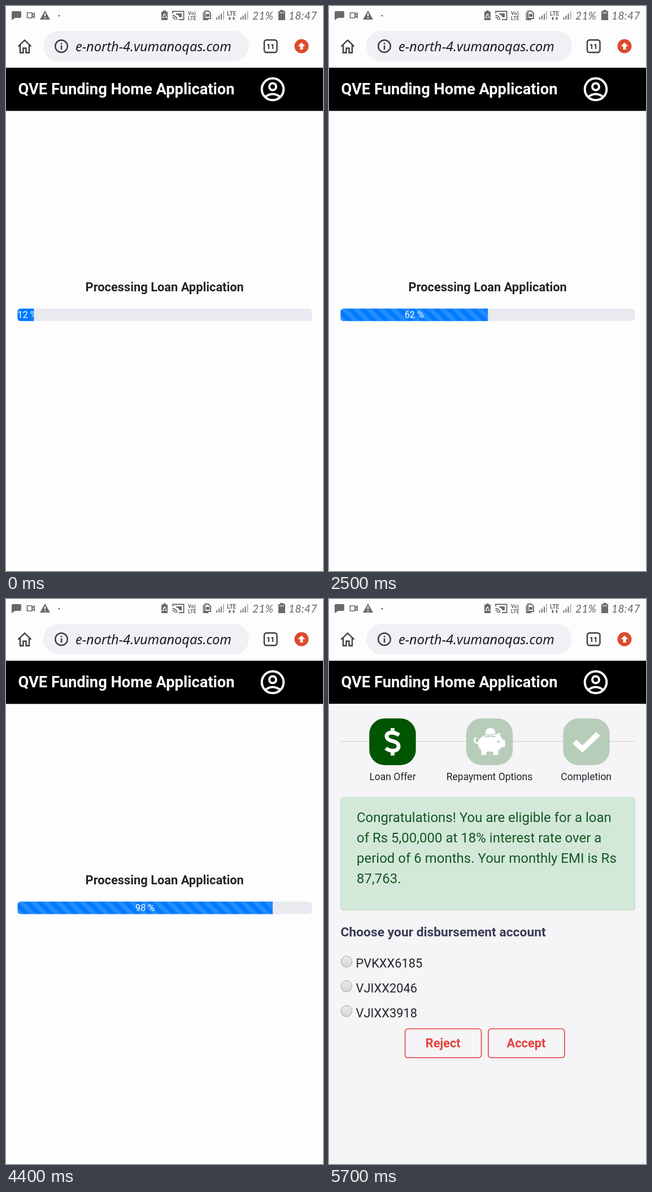
An HTML page that plays this animation: 561 by 998 pixels, repeating every 8 s.

```html
<!DOCTYPE html>
<html lang="en">
<head>
<meta charset="utf-8">
<title>Loan processing</title>
<style>
  html, body { margin: 0; width: 100%; height: 100%; overflow: hidden; background: #fefdfe; }
  svg { display: block; width: 100vw; height: 100vh; }
  text { font-family: Roboto, Arial, sans-serif; fill: #212529; }
  .bold { font-weight: 700; }
  .mid { text-anchor: middle; }
  .script { font-family: "Noto Sans", sans-serif; font-style: italic; fill: #1c1c1f; }
  .clock { font: italic 19px Lato, sans-serif; letter-spacing: .4px; fill: #666; }
  .tiny { font-weight: 700; fill: #6a6a6a; }
  .label { font-size: 17.5px; text-anchor: middle; }
  .alert text { font-size: 24px; fill: #155724; }
  .account { font-size: 21.84px; }
  .button rect { fill: none; stroke: #e2423e; stroke-width: 1.6; }
  .button text { font-size: 21.84px; font-weight: 700; text-anchor: middle; fill: #e2423e; }
  .line { fill: none; stroke: #3b3b40; stroke-width: 2.4; }
</style>
</head>
<body>
<svg viewBox="0 0 561 998" preserveAspectRatio="none">
  <defs>
    <pattern id="stripes" x="20.3" y="534.6" width="21.84" height="21.84" patternUnits="userSpaceOnUse">
      <path d="M0 21.84V10.92L10.92 21.84ZM0 0H10.92L21.84 10.92V21.84Z" fill="#fff" fill-opacity=".14"/>
    </pattern>
    <clipPath id="track"><rect x="20.3" y="534.6" width="521.2" height="22" rx="5.4"/></clipPath>
    <clipPath id="filled"><rect id="fillClip" x="20.3" y="534" height="23"/></clipPath>
    <clipPath id="face"><circle cx="472" cy="147" r="20"/></clipPath>
    <linearGradient id="knob" x2="0" y2="1">
      <stop stop-color="#ececec"/><stop offset="1" stop-color="#d4d4d4"/>
    </linearGradient>
    <g id="signal" fill="#747474">
      <path d="M0 20h2v4H0ZM4 17h2v7H4ZM8 13.500h2v10.500H8Z"/>
      <path d="M12 9h2v15h-2Z" fill="#b4b4b4"/>
    </g>
    <circle id="radio" cx="31" r="9.800" fill="url(#knob)" stroke="#a2a2a2"/>
  </defs>

  <rect width="561" height="998" fill="#fefdfe"/>

  <!-- status bar -->
  <g fill="#6a6a6a">
    <path d="M12 9H25Q27 9 27 11V19Q27 21 25 21H16L10 25V11Q10 9 12 9Z"/>
    <path d="M37.500 12h8.500v9h-8.500ZM46 16l4-3.500v8L46 17" fill="none" stroke="#6a6a6a" stroke-width="1.700"/>
    <path d="M69 8L78 24H60Z"/>
    <path d="M68 13h2v5h-2ZM68 20h2v2h-2Z" fill="#fff"/>
    <circle cx="94" cy="17" r="1.500"/>
    <path d="M278 8h5v2h3v15h-11V10h3Z"/>
    <path d="M280.500 13.500L284 20h-7Z" fill="none" stroke="#fff" stroke-width="1.500" stroke-dasharray="4 1.500"/>
    <path d="M295 13V9.500H314.500V24H306M294.500 16.500a8 8 0 0 1 8 8M294.500 20a4.500 4.500 0 0 1 4.500 4.500" fill="none" stroke="#6a6a6a" stroke-width="1.900"/>
    <path d="M301 13h10v7h-4q-2-5-6-5Z"/>
    <path d="M349.500 11V24H358M352 9h6l4 4v9h-10Z" fill="none" stroke="#6a6a6a" stroke-width="1.900"/>
    <path d="M354 14h6v5h-6Z"/>
    <use href="#signal" x="372"/>
    <use href="#signal" x="414.500"/>
    <path d="M396 19l2.500 3h-1.500v3h-2v-3h-1.500ZM403 25l-2.500-3h1.500v-3h2v3h1.500Z"/>
    <path d="M485 7h6v2h3v16h-12V9h3Z"/>
    <path d="M484 10.500h8v3h-8Z" fill="#aaa"/>
  </g>
  <text class="tiny" x="322" y="16" font-size="9">Vo)</text>
  <text class="tiny" x="322" y="25" font-size="9">LTE</text>
  <text class="tiny" x="391" y="16.500" font-size="10">LTE</text>
  <text class="clock" x="436" y="23.500">21%</text>
  <text class="clock" x="500" y="23.500">18:47</text>

  <!-- browser bar -->
  <path class="line" d="M21.500 71.500L33 60.500L44.500 71.500M25 69V82.500H30.500V74.500H35.500V82.500H41V69"/>
  <rect x="66" y="44" width="364" height="54" rx="27" fill="#f1f0f4"/>
  <circle class="line" cx="98" cy="71" r="10.800"/>
  <path d="M96.800 65h2.500v2.600h-2.500ZM96.800 69.500h2.500v7.500h-2.500Z" fill="#3b3b40"/>
  <text class="script" x="123" y="80" font-size="23.500">e-north-4.vumanoqas.com</text>
  <rect class="line" x="457" y="60" width="22.500" height="22" rx="4"/>
  <text class="bold mid" x="468.200" y="75.500" font-size="12.500">11</text>
  <circle cx="523" cy="71" r="12.500" fill="#dd4a2c"/>
  <path d="M523 64.500L529.500 71H525.500V77H520.500V71H516.500Z" fill="#fff"/>

  <!-- app header -->
  <rect y="109" width="561" height="76.300"/>
  <text class="bold" x="21.500" y="156" font-size="27.300" style="fill:#fff">QVE Funding Home Application</text>
  <g fill="none" stroke="#fff" stroke-width="4">
    <circle cx="472" cy="147" r="19.300"/>
    <circle cx="472" cy="142.500" r="6"/>
    <path d="M457 162Q472 149 487 162" clip-path="url(#face)"/>
  </g>

  <!-- progress screen -->
  <g id="progress">
    <text class="bold mid" x="280.700" y="504" font-size="21.840">Processing Loan Application</text>
    <g clip-path="url(#track)">
      <rect x="20" y="534" width="522" height="23" fill="#e8eaef"/>
      <g clip-path="url(#filled)">
        <rect x="20" y="534" width="521" height="23" fill="#007aff"/>
        <rect id="stripeFill" x="20" y="534" width="521" height="23" fill="url(#stripes)"/>
        <text id="percent" class="mid" y="551" font-size="16.200" style="fill:#fff"></text>
      </g>
    </g>
  </g>

  <!-- offer screen -->
  <g id="offer">
    <rect y="185.300" width="561" height="813" fill="#f5f4f6"/>
    <path d="M20 251.500H541" stroke="#cdced1"/>
    <rect x="71.300" y="211" width="82.400" height="82.400" rx="27" fill="#005500"/>
    <rect x="242.800" y="211" width="82.400" height="82.400" rx="27" fill="#b7cdba"/>
    <rect x="414.300" y="211" width="82.400" height="82.400" rx="27" fill="#b7cdba"/>

    <path d="M124 240.500C119 237 115 236 111 236C99 236 100 247 108 249.500L116 252C126 255 126 268 113 268C109 268 104 266.500 100.500 263.500M112.500 228V237M112.500 267V276.500" fill="none" stroke="#fff" stroke-width="6.800"/>

    <g fill="#fff">
      <circle cx="285.500" cy="236.500" r="9"/>
      <path d="M267 246Q274 239 285 239H295Q299 236 304 236L303 242Q307 245 308.500 249H312V262H306Q303 266 300 267V276H290V270H279V276H269V267Q262 262 263 252Q264 249 267 246Z" stroke="#b7cdba" stroke-width="1"/>
      <path d="M264 255Q257 255 257.500 249Q258 245 261 246" fill="none" stroke="#fff" stroke-width="2.500"/>
      <path d="M276 243.500Q285 240.500 294 243.500" fill="none" stroke="#b7cdba" stroke-width="2.500"/>
      <circle cx="300" cy="252" r="2" fill="#b7cdba"/>
    </g>
    <path d="M434.500 252L448.500 265L476.500 238" fill="none" stroke="#fff" stroke-width="9.500"/>

    <text class="label" x="112.500" y="320">Loan Offer</text>
    <text class="label" x="284" y="320">Repayment Options</text>
    <text class="label" x="455.200" y="320">Completion</text>

    <g class="alert">
      <rect x="20.800" y="350.700" width="520.400" height="199" rx="5" fill="#d3e8d9" stroke="#c0dfc8" stroke-width="1.300"/>
      <text x="49" y="393.500">Congratulations! You are eligible for a loan</text>
      <text x="49" y="429.500">of Rs 5,00,000 at 18% interest rate over a</text>
      <text x="49" y="465.500">period of 6 months. Your monthly EMI is Rs</text>
      <text x="49" y="501.500">87,763.</text>
    </g>

    <text class="bold" x="20.500" y="596" font-size="22.800" style="fill:#3a3c55">Choose your disbursement account</text>
    <use href="#radio" y="640.500"/>
    <use href="#radio" y="684.200"/>
    <use href="#radio" y="727.900"/>
    <text class="account" x="47.500" y="651.300">PVKXX6185</text>
    <text class="account" x="47.500" y="695">VJIXX2046</text>
    <text class="account" x="47.500" y="738.700">VJIXX3918</text>

    <g class="button">
      <rect x="134.600" y="759.300" width="135" height="51" rx="5"/>
      <text x="201.700" y="792.300">Reject</text>
      <rect x="281.900" y="759.300" width="135" height="51" rx="5"/>
      <text x="349" y="792.300">Accept</text>
    </g>
  </g>

  <g id="loader">
    <rect y="106" width="561" height="3" fill="#d3e4f3"/>
    <rect id="loaded" y="106" height="3" fill="#1f62d8"/>
  </g>
</svg>

<script>
  const LOOP = 8000, STEP = 100, LEFT = 20.3;
  const OFFER_AT = 5400, LOADER_FROM = 5200, LOADER_TO = 5700;

  // [time in ms, x of the bar's right edge]
  const barEdge = [
    [0, 49.3], [800, 113.7], [1800, 210.3], [3300, 362.3], [4400, 472], [4500, 484],
    [4600, 505], [4700, 523], [4800, 533.5], [4900, 538.5], [5000, 541]
  ];
  // [time in ms, share of the page loaded]
  const pageLoad = [[5200, 0.45], [5300, 0.8], [5400, 0.86], [5500, 1]];

  const $ = id => document.getElementById(id);
  const show = (id, on) => $(id).setAttribute("display", on ? "inline" : "none");

  function valueAt(points, t) {
    const next = points.findIndex(p => p[0] > t);
    if (next < 0) return points[points.length - 1][1];
    if (next === 0) return points[0][1];
    const [t0, a] = points[next - 1], [t1, b] = points[next];
    return a + (b - a) * (t - t0) / (t1 - t0);
  }

  function render(now) {
    const t = Math.floor((now % LOOP) / STEP) * STEP;
    const width = valueAt(barEdge, t) - LEFT;
    const percent = Math.min(100, 12 + 2 * Math.floor((t + 50) / 102));

    $("fillClip").setAttribute("width", width);
    $("percent").setAttribute("x", LEFT + Math.max(width, 34.5) / 2);
    $("percent").textContent = percent + " %";
    show("stripeFill", t > 0);
    show("progress", t < OFFER_AT);
    show("offer", t >= OFFER_AT);
    show("loader", t >= LOADER_FROM && t < LOADER_TO);
    $("loaded").setAttribute("width", 561 * valueAt(pageLoad, t));
  }

  function tick() {
    render(performance.now());
    requestAnimationFrame(tick);
  }
  tick();
</script>
</body>
</html>
```
